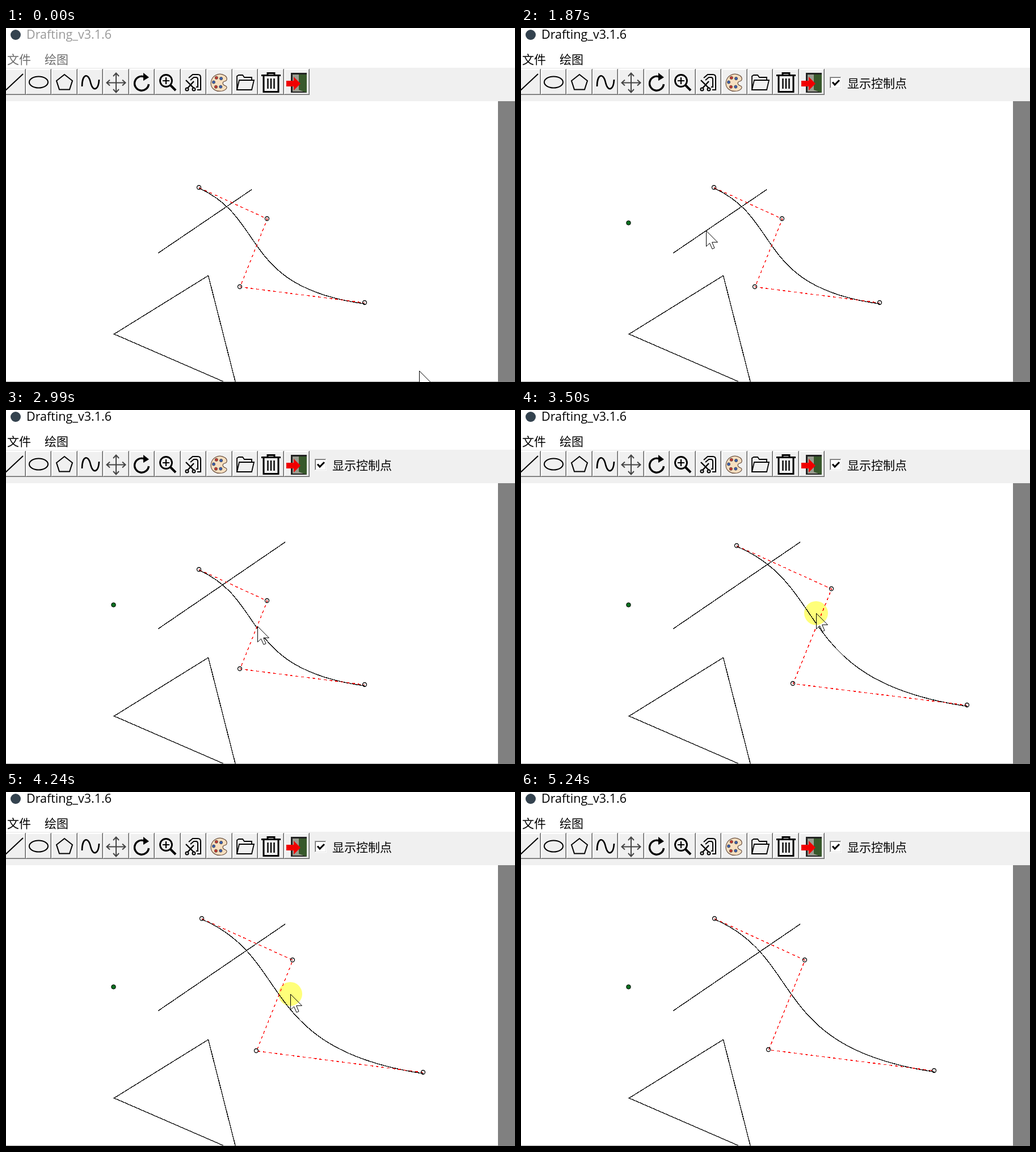
These frames come from a looping animation (897 by 624 pixels, 5370 ms). An HTML page:

```html
<!DOCTYPE html>
<html lang="zh-CN">
<head>
<meta charset="utf-8">
<title>Drafting_v3.1.6</title>
<style>
  html, body { margin: 0; width: 100%; height: 100%; overflow: hidden; background: #fff; }
  svg { display: block; width: 100%; height: 100%; }
  text { font: 21px "Noto Sans CJK SC", "Noto Sans CJK", sans-serif; }
  #title { font: 21.5px "Open Sans", "Noto Sans", sans-serif; }
  .crisp, .crisp * { shape-rendering: crispEdges; }
  .ink { fill: none; stroke: #000; }
  #ring { fill: #ffff7a; mix-blend-mode: multiply; }
</style>
</head>
<body>
<svg viewBox="0 0 897 624">
  <rect width="897" height="624" fill="#fff"/>
  <rect y="70" width="897" height="59" fill="#f0f0f0"/>
  <rect x="867" y="129" width="30" height="495" fill="#808080"/>
  <circle cx="17" cy="12" r="9" fill="#34434f"/>
  <text id="title" x="36" y="19">Drafting_v3.1.6</text>
  <g id="menu"><text x="2" y="63">文件</text><text x="68" y="63">绘图</text></g>

  <g id="buttons" class="crisp"></g>

  <g class="ink" stroke-width="2">
    <path d="M-2 111L30 81"/>
    <ellipse cx="57.5" cy="95.5" rx="16.5" ry="10"/>
    <path d="M103 82L117 93L112 108.5H94L89 93Z"/>
    <path d="M134 103C134 81 145 78 149 96C153 113 163 110 164 91" stroke-width="2.6"/>
    <path d="M194 80V113M178 96.5H210M189 85L194 79.5L199 85M189 108L194 113.5L199 108M183 91.5L177.5 96.5L183 101.5M205 91.5L210.5 96.5L205 101.5" stroke="#444"/>
    <path d="M251.5 99A12.5 12.5 0 1 1 243 85.8" stroke-width="3.4"/>
    <path d="M242 79L252 87L242 93Z" fill="#000" stroke="none"/>
    <circle cx="282" cy="93" r="10.5" stroke-width="2.8"/>
    <path d="M276 93H288M282 87V99" stroke-width="2.2"/>
    <path d="M290 101L299 110" stroke-width="4"/>
    <path d="M322 88L329 82H338Q343 82 343 87V109H337M325 92L331 87H335Q338 87 338 91V104H335"/>
    <path d="M317 92L331 106M331 94L320 106" stroke-width="2.4"/>
    <circle cx="319" cy="108" r="2.5"/><circle cx="331" cy="108" r="2.5"/>
  </g>

  <path d="M386 84C375 77 362 84 361 97C361 108 371 113 381 111C389 109 391 104 387 102C382 101 380 96 385 94C391 93 390 87 386 84Z" fill="#f6dfc0" stroke="#6b5140" stroke-width="1.2"/>
  <g id="paints" stroke="#444" stroke-width=".8"></g>

  <g class="ink" stroke-width="1.8">
    <path d="M407 109V85L410 83H417L420 87H433V92M407 109L411 92H437L433 109Z"/>
    <path d="M450 83.5H484M461 83V79.5H473V83" stroke-width="3"/>
    <path d="M454 85V112.5H480V85" stroke-width="3"/>
    <path d="M461.5 89V107M467 89V107M472.5 89V107" stroke-width="2.4"/>
  </g>
  <g>
    <rect x="502" y="79" width="28" height="35" fill="#222"/>
    <rect x="505" y="82" width="22" height="30" fill="#9a9c90"/>
    <path d="M516 82H530V114L516 109Z" fill="#38592c"/>
    <path d="M494 93H507V86L519 98L507 110V103H494Z" fill="#f00000"/>
  </g>

  <g id="option">
    <g class="crisp">
      <rect x="544" y="86" width="21" height="21" fill="#fff"/>
      <path d="M544.5 106V86.5H564" class="ink" style="stroke:#a0a0a0"/>
      <path d="M545.5 105V87.5H563" class="ink" style="stroke:#696969"/>
      <path d="M546 105.5H563.5V88" class="ink" style="stroke:#e3e3e3"/>
    </g>
    <path d="M549 95.5L553 100L561 92" class="ink" stroke-width="3"/>
    <text x="575" y="105">显示控制点</text>
  </g>

  <g class="crisp" transform="translate(.5 .5)">
    <path d="M356 436L190 539L406.2 633Z" class="ink" stroke-width="1.3"/>
    <path id="line" class="ink" stroke-width="1.3"/>
    <path id="curve" class="ink" stroke-width="1.3"/>
    <path id="frame" fill="none" stroke="#f00" stroke-width="1.4" stroke-dasharray="5 5"/>
  </g>
  <g id="knobs" class="ink" stroke-width="1.3"></g>
  <circle id="pivot" cx="189.5" cy="343.5" r="3.8" fill="#0a7020" stroke="#000"/>
  <path d="M0 623.5H867" stroke="#a8a8a8"/>
  <path id="cursor" d="M.5 .5V28L6.5 22.3L11 32.5L15 30.7L10.7 20.7H20.5Z" fill="#fff" stroke="#000"/>
  <circle id="ring" r="21"/>
</svg>
<script>
const LOOP = 5370, STEP = 125;
const $ = id => document.getElementById(id);

function add(parent, tag, attrs) {
  const el = document.createElementNS("http://www.w3.org/2000/svg", tag);
  for (const k in attrs) el.setAttribute(k, attrs[k]);
  return $(parent).appendChild(el);
}

// Raised toolbar buttons
for (let i = 0; i < 12; i++) {
  const x = Math.round(45.5 * i - 11), r = Math.round(45.5 * i + 34.5);
  const edge = (d, stroke) => add("buttons", "path", { d, stroke, fill: "none" });
  edge(`M${x + .5} 117V72.5H${r}`, "#fff");
  edge(`M${x + 1.5} 116V73.5H${r - 1}`, "#fff");
  edge(`M${x + 1} 116.5H${r - 1.5}V73`, "#a0a0a0");
  edge(`M${x} 117.5H${r - .5}V72`, "#696969");
}
// Paint blobs around the palette
for (let i = 0; i < 5; i++) {
  const a = 1 + i * 1.1;
  add("paints", "circle", {
    cx: 374 + 8 * Math.cos(a), cy: 96 + 9 * Math.sin(a), r: 2.6,
    fill: i % 2 ? "#c8362c" : "#3c60b0"
  });
}
const knobs = [0, 1, 2, 3].map(() => add("knobs", "circle", { r: 3.5 }));

// Key points: time, then values that run straight to the next key
const pointer = [
  [0, 728, 604], [375, 324, 109], [625, 324, 109], [1000, 286, 106], [1125, 286, 106],
  [1375, 189, 343], [1500, 189, 343], [1750, 338, 371], [1875, 326, 357], [2000, 326, 357],
  [2500, 388, 412], [2875, 366, 380], [3000, 443, 381], [3250, 443, 381], [3500, 520, 358],
  [3750, 622, 357], [4000, 602, 357], [4250, 501, 356], [4625, 486, 355], [4875, 640, 188], [5250, 810, 640]
];
const segment = [
  [2000, 268, 396, 433, 284], [2500, 290, 406, 540, 228], [2875, 268, 385, 492, 232]
];
// Start point and scale of the curve
const growth = [
  [3250, 340, 281, 1], [3500, 380, 239, 1.39], [3750, 403, 210, 1.68],
  [4000, 397, 210, 1.62], [4250, 345, 223, 1.336], [4500, 341, 223, 1.325]
];
const shape = [[0, 0], [120, 55], [71.5, 174.5], [292, 202.5]];

function at(keys, t) {
  const next = keys.findIndex(k => k[0] > t);
  if (next < 1) return keys.at(next).slice(1);
  const a = keys[next - 1], b = keys[next];
  const u = (t - a[0]) / (b[0] - a[0]);
  return a.map((v, i) => v + (b[i] - v) * u).slice(1);
}
const within = (t, from, to) => t >= from && t < to;
const show = (id, on) => $(id).setAttribute("visibility", on ? "visible" : "hidden");

function draw(time) {
  const t = Math.floor((time + 12) / STEP) * STEP;

  const active = t >= 1125;
  $("title").setAttribute("fill", active ? "#000" : "#999");
  $("menu").setAttribute("fill", active ? "#000" : "#6d6d6d");
  show("option", active);
  show("pivot", t >= 1500);

  const [ax, ay, bx, by] = at(segment, t).map(Math.round);
  $("line").setAttribute("d", `M${ax} ${ay}L${bx} ${by}`);

  const [x, y, s] = at(growth, t);
  const p = shape.map(([dx, dy]) => [Math.round(x + dx * s), Math.round(y + dy * s)]);
  // Rounding while scaling lifts the curve a little off its control points.
  const lift = 11 * (s - 1);
  const [a, b, c, d] = p;
  $("curve").setAttribute("d",
    `M${a[0]} ${a[1] + 1}C${b[0]} ${b[1] - lift} ${c[0]} ${c[1] - lift} ${d[0] + 1} ${d[1] + 2}`);
  $("frame").setAttribute("d", "M" + p.join("L"));
  knobs.forEach((k, i) => {
    k.setAttribute("cx", p[i][0]);
    k.setAttribute("cy", p[i][1]);
  });

  const place = `translate(${at(pointer, t).map(Math.round).join(" ")})`;
  $("cursor").setAttribute("transform", place);
  $("ring").setAttribute("transform", place);
  show("ring", within(t, 1125, 1250) || within(t, 2125, 3000) || within(t, 3375, 4750));
}

const start = performance.now();
function tick() {
  draw((performance.now() - start) % LOOP);
  requestAnimationFrame(tick);
}
tick();
</script>
</body>
</html>
```
